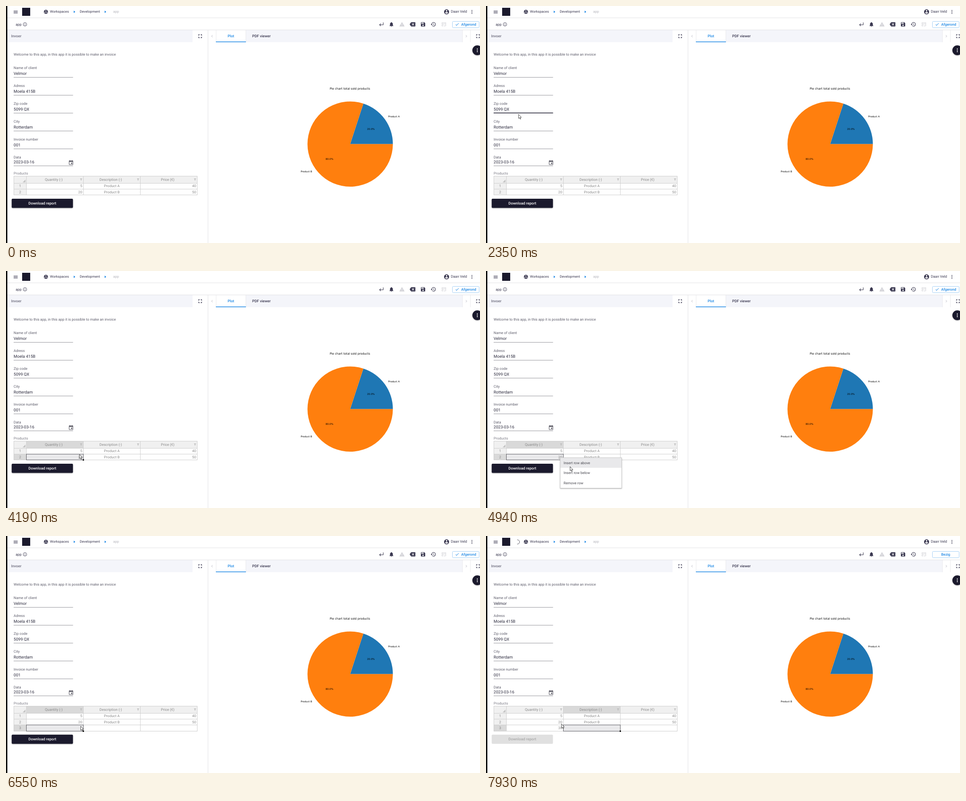
These frames come from a looping animation (1057 by 530 pixels, 8 s). An HTML page:

```html
<!DOCTYPE html>
<html lang="en">
<head>
<meta charset="utf-8">
<title>Invoice app</title>
<style>
html, body { margin: 0; width: 100%; height: 100%; overflow: hidden; background: #fff; }
svg { display: block; width: 1057px; height: 530px; font-family: Roboto, Arial, sans-serif; }
text { white-space: pre; text-rendering: geometricPrecision; }
.plot { font-family: "DejaVu Sans", Verdana, sans-serif; }
.raised { filter: drop-shadow(0 1px 1px rgba(0, 0, 0, 0.3)); }
</style>
</head>
<body>
<svg id="stage" viewBox="0 0 1057 530"></svg>
<script>
const stage = document.getElementById('stage');
const INK = '#3a3850', DARK = '#1b1a2d', BLUE = '#1e88e5', PALE = '#f4f5fa', LINE = '#e2e2e6', GREY = '#8a8a8a', LABEL = '#5f5e6c';

function add(tag, attrs, parent = stage) {
  const el = document.createElementNS('http://www.w3.org/2000/svg', tag);
  for (const k in attrs) el.setAttribute(k, attrs[k]);
  return parent.appendChild(el);
}
const group = (parent = stage) => add('g', {}, parent);
const rect = (x, y, width, height, fill, parent, more) => add('rect', { x, y, width, height, fill, ...more }, parent);
const circle = (cx, cy, r, fill, parent, more) => add('circle', { cx, cy, r, fill, ...more }, parent);
const path = (d, fill, parent, more) => add('path', { d, fill, ...more }, parent);
function text(x, y, str, size = 8, fill = INK, more, parent) {
  const el = add('text', { x, y, 'font-size': size, fill, ...more }, parent);
  el.textContent = str;
  return el;
}
const MID = { 'text-anchor': 'middle' }, END = { 'text-anchor': 'end' }, MEDIUM = { 'font-weight': 500 };

const ICONS = {
  menu: 'M3 18h18v-2H3v2zm0-5h18v-2H3v2zm0-7v2h18V6H3z',
  enter: 'M19 4v9H6.8l3.6-3.6L9 8l-6 6 6 6 1.4-1.4L6.8 15H21V4z',
  bell: 'M12 22c1.1 0 2-.9 2-2h-4c0 1.1.89 2 2 2zm6-6v-5c0-3.07-1.64-5.64-4.5-6.32V4c0-.83-.67-1.5-1.5-1.5s-1.5.67-1.5 1.5v.68C7.63 5.36 6 7.92 6 11v5l-2 2v1h16v-1l-2-2z',
  warning: 'M1 21h22L12 2 1 21zm12-3h-2v-2h2v2zm0-4h-2v-4h2v4z',
  erase: 'M22 3H7c-.69 0-1.23.35-1.59.88L0 12l5.41 8.11c.36.53.9.89 1.59.89h15c1.1 0 2-.9 2-2V5c0-1.1-.9-2-2-2zm-3 12.59L17.59 17 14 13.41 10.41 17 9 15.59 12.59 12 9 8.41 10.41 7 14 10.59 17.59 7 19 8.41 15.41 12 19 15.59z',
  save: 'M17 3H5c-1.11 0-2 .9-2 2v14c0 1.1.89 2 2 2h14c1.1 0 2-.9 2-2V7l-4-4zm-5 16c-1.66 0-3-1.34-3-3s1.34-3 3-3 3 1.34 3 3-1.34 3-3 3zm3-10H5V5h10v4z',
  history: 'M13 3c-4.97 0-9 4.03-9 9H1l3.89 3.89.07.14L9 12H6c0-3.87 3.13-7 7-7s7 3.13 7 7-3.13 7-7 7c-1.93 0-3.68-.79-4.94-2.06l-1.42 1.42C8.27 19.99 10.51 21 13 21c4.97 0 9-4.03 9-9s-4.03-9-9-9zm-1 5v5l4.28 2.54.72-1.21-3.5-2.08V8H12z',
  rows: 'M3 4h18v7H3zM5 6v3h14V6zM3 13h7v2H5v3h5v2H3zM21 13v2h-4v-2zM13 16l3 3 5-5 1 1.4-6 6-4.4-4z',
  expand: 'M7 14H5v5h5v-2H7v-3zm-2-4h2V7h3V5H5v5zm12 7h-3v2h5v-5h-2v3zM14 5v2h3v3h2V5h-5z',
  event: 'M17 12h-5v5h5v-5zM16 1v2H8V1H6v2H5c-1.11 0-1.99.9-1.99 2L3 19c0 1.1.89 2 2 2h14c1.1 0 2-.9 2-2V5c0-1.1-.9-2-2-2h-1V1h-2zm3 18H5V8h14v11z',
  account: 'M12 2C6.48 2 2 6.48 2 12s4.48 10 10 10 10-4.48 10-10S17.52 2 12 2zm0 3c1.66 0 3 1.34 3 3s-1.34 3-3 3-3-1.34-3-3 1.34-3 3-3zm0 14.2c-2.5 0-4.71-1.28-6-3.22.03-1.99 4-3.08 6-3.08 1.99 0 5.97 1.09 6 3.08-1.29 1.94-3.5 3.22-6 3.22z',
  info: 'M11 7h2v2h-2zm0 4h2v6h-2zm1-9C6.48 2 2 6.48 2 12s4.48 10 10 10 10-4.48 10-10S17.52 2 12 2zm0 18c-4.41 0-8-3.59-8-8s3.59-8 8-8 8 3.59 8 8-3.59 8-8 8z',
  check: 'M9 16.17 4.83 12l-1.42 1.41L9 19 21 7l-1.41-1.41z',
  left: 'M15.41 7.41 14 6l-6 6 6 6 1.41-1.41L10.83 12z',
  right: 'M10 6 8.59 7.41 13.17 12l-4.58 4.59L10 18l6-6z',
  play: 'M8 5v14l9-7z',
  funnel: 'M5 5h14l-5.5 7v6l-3 2v-8z'
};
const icon = (name, x, y, fill = INK, s = 4 / 7, parent) =>
  path(ICONS[name], fill, parent, { transform: `translate(${x} ${y}) scale(${s}) translate(-12 -12)` });
const dots = (x, y, gap, r, fill) => [-gap, 0, gap].forEach(d => circle(x, y + d, r, fill));

// Top bars
icon('menu', 21.5, 13.5, INK, 0.5);
rect(36, 4, 18, 18, DARK);
circle(89, 13, 4.5, INK);
[[89, 11], [87.2, 14.3], [90.8, 14.3]].forEach(([x, y]) => circle(x, y, 1.1, '#fff'));
text(98, 15.3, 'Workspaces', 7.7);
text(164.5, 15.3, 'Development', 7.7);
text(239, 15.3, 'app', 7.7, '#b4b4bc');
[152.5, 221.5].forEach(x => icon('play', x, 13, BLUE, 0.38));
icon('account', 982.5, 13, INK, 0.56);
text(992, 15.3, 'Daan Veld');
dots(1039, 13.3, 3.2, 1, INK);
rect(3, 26, 1054, 1, LINE);
text(21.5, 43.5, 'app', 8);
icon('info', 42.3, 41, INK, 0.43);
[['enter', 837], ['bell', 859.5], ['warning', 883, '#d3d3d8'], ['erase', 906.5], ['save', 930],
 ['history', 953], ['rows', 976.5, '#d3d3d8']].forEach(([n, x, c]) => icon(n, x, 41, c, 0.53));
rect(995.5, 34.5, 59.5, 14, '#fff', stage, { stroke: '#a5d0f5', rx: 2 });
const check = icon('check', 1006, 41, BLUE, 0.43);
const status = text(1015, 43.8, '', 8.1, BLUE, MEDIUM);

// Panel headers
rect(3, 53, 1054, 1, LINE);
rect(3, 54, 413, 27, PALE);
text(11.5, 70.4, 'Invoer', 8.2, '#6c6b7c', MEDIUM);
icon('expand', 433, 67.5);
rect(535, 54, 483, 27, PALE);
[468, 534.5, 1017.5, 1035].forEach(x => rect(x, 54, 0.7, 27, LINE));
rect(450, 54, 1, 476, LINE);
icon('left', 459.5, 67.5, '#c8c8d0', 0.45);
icon('right', 1026.5, 67.5, '#c8c8d0', 0.45);
text(501.5, 70.3, 'Plot', 8.2, BLUE, { ...MEDIUM, ...MID });
text(549, 70.3, 'PDF viewer', 8.2, INK, MEDIUM);
rect(468, 79.5, 67, 1.5, BLUE);
icon('expand', 1052.5, 67.5);
circle(1051, 99, 11, DARK, stage, { class: 'raised' });
dots(1051, 99, 3.2, 1.1, '#fff');

// Form
text(17, 110.8, 'Welcome to this app, in this app it is possible to make an invoice', 8, LABEL);
const FIELDS = [['Name of client', 'Velmor'], ['Adress', 'Moela 415B'], ['Zip code', '5099 QX'],
  ['City', 'Rotterdam'], ['Invoice number', '001'], ['Data', '2023-03-16']];
const hoverLines = FIELDS.map(([label, value], i) => {
  const y = 40 * i, up = i === 5 ? 2 : 0;
  text(17, 140.7 + y, label, 8, LABEL);
  text(17, 154.2 + y - up, value, 9.14, '#2b2a3d');
  rect(17, 159 + y - up, 132.5, 0.9, '#8d8d93');
  return rect(17, 158.5 + y - up, 132.5, 1.5, DARK);
});
icon('event', 145, 350.5, '#55545f', 0.52);
text(17, 377, 'Products', 8, '#7d7c87');

// Table
const COLS = [17.5, 45.5, 172.5, 299.5, 426.5], TOP = 380.5, ROW_Y = [396.5, 409.5, 422.5, 436.5];
const rowH = i => ROW_Y[i + 1] - ROW_Y[i];
const GRID = '#cfcfcf', HEAD = '#f0f0f0', HEAD_ON = '#d9d9d9';
const colHeads = ['Quantity (-)', 'Description (-)', 'Price (€)'].map((label, i) => {
  const x = COLS[i + 1];
  const bg = rect(x, TOP, 127, 16, HEAD, stage, { stroke: GRID });
  text(x + 61, 390.6, label, 8, GREY, MID);
  icon('funnel', x + 122, 388.3, '#b9b9b9', 0.36);
  return bg;
});
rect(COLS[0], TOP, 28, 16, HEAD, stage, { stroke: GRID });
path('M43.5 388v6.5h-6.5z', '#c4c4c4');
const rows = [['5', 'Product A', '40'], ['20', 'Product B', '50'], ['', '', '']].map((cells, i) => {
  const g = group(), y = ROW_Y[i], base = 405.3 + 13.3 * i;
  const head = rect(COLS[0], y, 28, rowH(i), HEAD, g, { stroke: GRID });
  text(31.5, base, i + 1, 8, GREY, MID, g);
  cells.forEach((_, c) => rect(COLS[c + 1], y, 127, rowH(i), '#fff', g, { stroke: GRID }));
  return { g, head, base, cells };
});
const pick = group();
const pickBox = rect(0, 0, 127, 13, '#fff', pick, { stroke: '#5c5c63' });
const pickDot = rect(0, 0, 3, 3, '#111', pick);
const rowTexts = rows.map(({ cells, base }) => cells.map((s, c) =>
  text([170, 236, 424][c], base, s, 8, GREY, c === 1 ? MID : END)));

// Download button
const button = group();
const buttonBox = rect(12.7, 431, 136.6, 20.5, DARK, button, { rx: 2 });
const buttonText = text(81, 443.7, 'Download report', 8.4, '#fff', { ...MEDIUM, ...MID }, button);

// Pie chart
const PIE = { x: 767.5, y: 308.7, r: 95.2 };
const polar = (deg, k) => {
  const a = deg * Math.PI / 180;
  return [PIE.x + PIE.r * k * Math.cos(a), PIE.y - PIE.r * k * Math.sin(a)];
};
const plot = add('g', { class: 'plot' });
function slice(from, to, fill, label, pct, anchor) {
  path(`M${PIE.x} ${PIE.y}L${polar(from, 1)}A${PIE.r} ${PIE.r} 0 ${+(to - from > 180)} 0 ${polar(to, 1)}Z`, fill, plot);
  const mid = (from + to) / 2, [lx, ly] = polar(mid, 1.1), [px, py] = polar(mid, 0.6);
  text(lx, ly + 1.9, label, 5.33, '#000', { 'text-anchor': anchor }, plot);
  text(px, py + 1.9, pct, 5.33, '#000', MID, plot);
}
slice(0, 72, '#1f77b4', 'Product A', '20.0%', 'start');
slice(72, 360, '#ff7f0e', 'Product B', '80.0%', 'end');
text(767, 186.7, 'Pie chart total sold products', 6.4, '#000', MID, plot);

// Context menu
const menu = add('g', { class: 'raised' });
rect(165.5, 417.5, 137, 68, '#fff', menu, { stroke: '#cccccc' });
const menuItems = ['Insert row above', 'Insert row below', 'Remove row'].map((label, i) => {
  const y = 418 + 22.3 * i, bg = rect(166, y, 136, 22.3, '#fff', menu);
  text(173, y + 14, label, 8, '#4a4a52', {}, menu);
  return { y, bg };
});

// Spinners and pointer
const bigSpin = path('', 'none', stage, { stroke: '#55545f' });
const smallSpin = path('', 'none', stage, { stroke: '#64aef0' });
const arrow = path('M.4.4V9.6L2.5 7.7 4 11.2 5.4 10.6 3.9 7.2H6.7z', '#fff', stage, { stroke: '#222', 'stroke-width': 0.8 });
const beam = path('M-2.5-5H-.8L0-4.4.8-5H2.5M0-4.4V4.4M-2.5 5H-.8L0 4.4.8 5H2.5', 'none', stage, { stroke: '#222', 'stroke-width': 0.9 });
rect(0, 0, 3, 530, '#000');

// Bursts of screen updates: start, end, steps
const BURSTS = [[120, 120, 1], [310, 1110, 13], [1180, 1880, 11], [2020, 2020, 1], [2280, 3040, 12], [3100, 3710, 10],
  [3980, 4270, 5], [4530, 5280, 11], [5340, 5340, 1], [5540, 6210, 11], [6410, 7170, 12], [7240, 7930, 11]];
function snap(t) {
  const b = BURSTS.filter(([s]) => s <= t).pop();
  if (!b) return 0;
  const [s, e, n] = b;
  if (n === 1) return s;
  const dt = (e - s) / (n - 1);
  return s + dt * Math.min(n - 1, Math.floor((t - s) / dt + 0.05));
}

// Pointer path: time, x, y
const MOVES = [[243, 1022, 529], [420, 860, 440], [620, 520, 290], [820, 220, 190], [960, 100, 165], [1110, 76, 182],
  [1390, 76, 191], [1880, 71.5, 234], [2020, 71.5, 235], [2210, 71.5, 235], [3040, 76, 276], [3168, 87, 291],
  [3710, 163.5, 410], [4460, 163.5, 410], [5280, 207, 460], [5340, 208, 460], [5475, 208, 460], [5875, 164.5, 438],
  [6210, 165, 428], [6410, 165, 428], [6760, 168, 420]];
function pointer(t) {
  const i = MOVES.findIndex(m => m[0] > t);
  if (i < 1) return (i ? MOVES[MOVES.length - 1] : MOVES[0]).slice(1);
  const [a, b] = [MOVES[i - 1], MOVES[i]], u = (t - a[0]) / (b[0] - a[0]);
  return [a[1] + (b[1] - a[1]) * u, a[2] + (b[2] - a[2]) * u];
}

// Field hover: enter, leave
const HOVERS = [null, [990, 1560], [1620, 2520], [2590, 3095], [3215, 3333], [3385, 3490]];
const clamp = v => Math.max(0, Math.min(1, v));
const show = (el, on) => el.setAttribute('visibility', on ? 'visible' : 'hidden');
const fill = (el, c) => el.setAttribute('fill', c);
function arc(el, x, y, r, mid, len) {
  const p = deg => { const a = deg * Math.PI / 180; return `${x + r * Math.cos(a)} ${y + r * Math.sin(a)}`; };
  el.setAttribute('d', `M${p(mid - len / 2)}A${r} ${r} 0 ${+(len > 180)} 1 ${p(mid + len / 2)}`);
}

function draw(time) {
  const t = snap(time), [x, y] = pointer(t);

  hoverLines.forEach((line, i) => {
    const h = HOVERS[i];
    line.setAttribute('opacity', h ? clamp((t - h[0]) / 140) * clamp(1 - (t - h[1]) / 150) : 0);
  });

  const inField = y > 180 && y < 362 && x < 138 && (y - 181) % 40 < 20 && t > 900;
  show(beam, inField);
  show(arrow, t >= 120 && !inField);
  (inField ? beam : arrow).setAttribute('transform', `translate(${x} ${y})`);

  const added = t >= 5600, busy = t >= 6600;
  show(rows[2].g, added);
  button.setAttribute('transform', `translate(0 ${added ? 13.3 : 0})`);
  button.setAttribute('class', busy ? '' : 'raised');
  fill(buttonBox, busy ? '#e0e0e0' : DARK);
  fill(buttonText, busy ? '#a9a9a9' : '#fff');

  const row = t >= 6470 ? 2 : 1, col = t >= 7790 ? 1 : 0;
  const active = t >= 3980 && (t < 5540 || t >= 6470), typing = t >= 7370 && t < 7790;
  show(pick, t >= 3980);
  const px = COLS[col + 1], py = ROW_Y[row];
  pickBox.setAttribute('x', px);
  pickBox.setAttribute('y', py);
  pickBox.setAttribute('height', rowH(row));
  pickDot.setAttribute('x', px + 125.5);
  pickDot.setAttribute('y', py + rowH(row) - 1.5);
  fill(pickBox, typing ? '#fff' : active ? '#e9e9eb' : '#f2f2f4');
  colHeads.forEach((el, i) => fill(el, active && i === col ? HEAD_ON : HEAD));
  rows.forEach((r, i) => fill(r.head, active && i === row ? HEAD_ON : HEAD));
  rowTexts[2][0].textContent = '30'.slice(0, t < 7370 ? 0 : t < 7510 ? 1 : 2);

  show(menu, t >= 4265 && t < 5540);
  menuItems.forEach(m => fill(m.bg, x > 166 && y >= m.y && y < m.y + 22.3 ? '#e9e9eb' : '#fff'));

  show(check, !busy);
  status.textContent = busy ? 'Bezig' : 'Afgerond';
  show(bigSpin, busy);
  show(smallSpin, busy && t < 7900);
  const turn = (t - 7030) * 0.3;
  arc(bigSpin, 70, 13.3, 4.8, 90 + turn, 190);
  arc(smallSpin, 1006, 41, 3.8, -30 + turn, 20 + 160 * clamp(Math.cos((t - 7030) / 900 * Math.PI / 2)));
}

const start = performance.now();
function tick() {
  draw((performance.now() - start) % 8000);
  requestAnimationFrame(tick);
}
tick();
</script>
</body>
</html>
```
